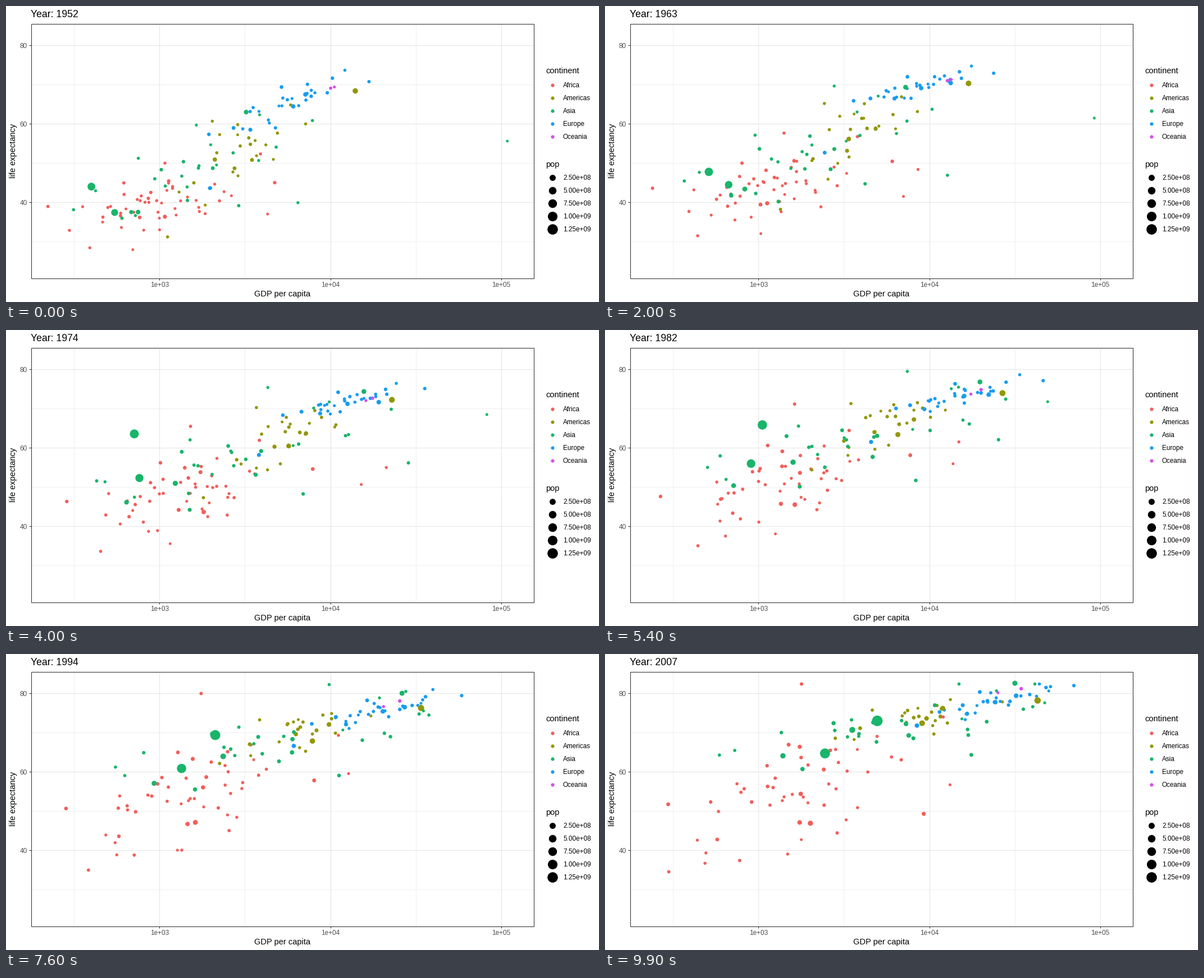
Animation, 1056 px wide and 528 px high, one loop 10000 ms. Source, as a matplotlib script:

```python
import numpy as np
import matplotlib
import matplotlib.pyplot as plt
from matplotlib.animation import FuncAnimation
from matplotlib.patches import Rectangle

matplotlib.rcParams["font.family"] = "Liberation Sans"

W, H, DPI = 1056, 528, 96
FRAMES, INTERVAL = 100, 100
YEARS = np.linspace(1952, 2007, FRAMES)
KEY_YEARS = [1952, 1963, 1974, 1989, 2007]
CENSUS = np.arange(1952, 2008, 5)
LEFT, RIGHT, TOP, BOTTOM = 44.5, 939.5, 31.5, 485.5
X_RANGE = (2.2487, 5.1887)  # log10 of GDP
Y_RANGE = (20.65, 85.55)
PX = 72 / DPI

rng = np.random.default_rng(11)


def x_px(log_gdp):
    return LEFT + (log_gdp - X_RANGE[0]) / (X_RANGE[1] - X_RANGE[0]) * (RIGHT - LEFT)


def y_px(life):
    return BOTTOM - (life - Y_RANGE[0]) / (Y_RANGE[1] - Y_RANGE[0]) * (BOTTOM - TOP)


def diameter(millions):
    return 4.73 + 14.2 * np.sqrt(millions / 1319)


def timeline(values):
    return np.interp(YEARS, KEY_YEARS, values)


def spread(n):
    """Evenly stratified bell-shaped scores in random order."""
    p = (rng.permutation(n) + 0.5) / n
    return 0.52 * np.log(p / (1 - p))


def drift(n):
    """Scores that wander slowly, with a small kink at each census."""
    u = np.linspace(0, 1, FRAMES)[:, None]
    a, b = spread(n), spread(n)
    b = 0.75 * a + 0.66 * b
    steps = rng.normal(0, 0.09, (len(CENSUS), n))
    kinks = np.array([np.interp(YEARS, CENSUS, s) for s in steps.T]).T
    mix = a * (1 - u) + b * u
    return mix / np.sqrt(1 - 0.5 * u * (1 - u)) + kinks


dots = []


def add_dot(color, log_gdp, life, pop, growth):
    size = np.linspace(diameter(pop / growth), diameter(pop), FRAMES)
    dots.append((color, x_px(log_gdp), y_px(life), size))


def add_cloud(color, n, growth, typical_pop, corr, gdp, gdp_sd, life, life_sd):
    """n dots scattered around a moving centre."""
    z, w = drift(n), drift(n)
    lg = timeline(gdp)[:, None] + timeline(gdp_sd)[:, None] * z
    tilt = corr * z + np.sqrt(1 - corr ** 2) * w
    le = timeline(life)[:, None] + timeline(life_sd)[:, None] * tilt
    le = np.clip(le, 24, 82.4)
    pops = np.clip(typical_pop * np.exp(1.1 * spread(n)), 0.3, 80)
    for k in range(n):
        add_dot(color, lg[:, k], le[:, k], pops[k], growth)


def add_road(color, pop, growth, gdp, life):
    """One prominent dot through its key positions."""
    add_dot(color, timeline(np.log10(gdp)), timeline(life), pop, growth)


RED, OLIVE, GREEN, BLUE, PINK = "#F35E5A", "#929705", "#18B56A", "#189CF2", "#D84FEB"
COLORS = {"Africa": RED, "Americas": OLIVE, "Asia": GREEN, "Europe": BLUE, "Oceania": PINK}

add_cloud(RED, 48, 3.75, 9, 0.45,
          [2.95, 3.05, 3.11, 3.12, 3.18], [0.26, 0.28, 0.28, 0.31, 0.38],
          [39.3, 43.5, 48.2, 53, 54.6], [4.9, 5.5, 6.2, 7.8, 9.3])
add_cloud(OLIVE, 22, 2.6, 9, 0.6,
          [3.46, 3.56, 3.71, 3.76, 3.93], [0.21, 0.22, 0.22, 0.23, 0.26],
          [52.3, 57.5, 62.5, 69, 73.8], [7.6, 7.3, 6.4, 4.5, 3.4])
add_cloud(GREEN, 26, 2.8, 18, 0.7,
          [3.17, 3.3, 3.48, 3.66, 3.82], [0.34, 0.37, 0.44, 0.48, 0.5],
          [47.2, 53.2, 58.2, 66.5, 71.8], [8.5, 8.8, 8.8, 7.2, 6.2])
add_cloud(BLUE, 28, 1.3, 10, 0.82,
          [3.75, 3.94, 4.1, 4.24, 4.4], [0.22, 0.2, 0.19, 0.22, 0.22],
          [65.2, 69.6, 71.8, 74.6, 78.1], [4.2, 2.4, 2.1, 2.4, 2.5])

add_road(RED, 135, 4, [1077, 1120, 1820, 1485, 2014], [36.3, 39.7, 43.6, 47.2, 46.9])
add_road(RED, 6, 6, [2388, 8500, 21450, 10800, 12057], [42.7, 48.3, 54.8, 67.4, 74])
add_road(RED, 1.5, 3, [4293, 7000, 15200, 12600, 13206], [37, 41.4, 50.5, 60.7, 56.7])
add_road(RED, 44, 3, [4725, 6050, 7890, 7590, 9270], [45, 50.4, 54.5, 61.3, 49.3])
add_road(OLIVE, 301, 1.9, [13990, 16900, 22800, 30800, 42952], [68.4, 70.3, 72.2, 75.5, 78.2])
add_road(OLIVE, 190, 3.4, [2109, 3360, 5680, 7400, 9066], [50.9, 56.1, 60.4, 66, 72.4])
add_road(OLIVE, 109, 3.6, [3478, 4830, 7180, 9050, 11978], [50.8, 58.7, 63.6, 70.4, 76.2])
add_road(GREEN, 1319, 2.4, [400, 511, 705, 1500, 4959], [44, 47.6, 63.5, 67.9, 73])
add_road(GREEN, 1110, 3, [547, 669, 760, 1055, 2452], [37.4, 44.4, 52.2, 59.3, 64.7])
add_road(GREEN, 127, 1.5, [3217, 7200, 15600, 24300, 31656], [63, 69.3, 74.3, 79, 82.6])
add_road(GREEN, 2.5, 15, [108382, 92300, 83500, 31000, 47307], [55.6, 61.4, 68.4, 74.7, 77.6])
add_road(GREEN, 28, 7, [6460, 12650, 28700, 22800, 21655], [39.9, 46.8, 56, 67.4, 72.8])
add_road(GREEN, 224, 2.7, [750, 829, 1230, 2000, 3541], [37.5, 43.3, 50.8, 61.2, 70.7])
add_road(GREEN, 150, 3.2, [684, 694, 640, 790, 1391], [37.5, 41.7, 46, 54.2, 64.1])
add_road(BLUE, 71, 3.2, [1969, 2430, 3800, 5350, 8458], [43.6, 52.6, 58.1, 64.5, 71.8])
add_road(BLUE, 82, 1.2, [7144, 13280, 19100, 25400, 32170], [67.5, 70.4, 71.6, 75.3, 79.4])
add_road(PINK, 20, 2.3, [10040, 12700, 17600, 22500, 34435], [69.1, 71, 72.6, 76.8, 81.2])
add_road(PINK, 4, 2, [10557, 13400, 16100, 18800, 25185], [69.4, 71.3, 72, 75.2, 80.2])

fills = [dot[0] for dot in dots]
xs, ys, sizes = (np.array([dot[k] for dot in dots]).T for k in (1, 2, 3))

fig = plt.figure(figsize=(W / DPI, H / DPI), dpi=DPI, facecolor="white")
ax = fig.add_axes([0, 0, 1, 1])
ax.set_xlim(0, W)
ax.set_ylim(H, 0)
ax.axis("off")


def line(x0, y0, x1, y1, color, width):
    ax.plot([x0, x1], [y0, y1], color=color, lw=width * PX, solid_capstyle="butt", zorder=1)


def label(x, y, text, size, color="black", **kw):
    return ax.text(x, y, text, fontsize=size, color=color, zorder=5, **kw)


def circle(x, y, d, color):
    ax.scatter([x], [y], s=(d * PX) ** 2, c=color, linewidths=0, zorder=3)


for v in (2.5, 3.5, 4.5):
    line(x_px(v), TOP, x_px(v), BOTTOM, "#EBEBEB", 0.8)
for v in (30, 50, 70):
    line(LEFT, y_px(v), RIGHT, y_px(v), "#EBEBEB", 0.8)
for v in (3, 4, 5):
    x = x_px(v)
    line(x, TOP, x, BOTTOM, "#E5E5E5", 1.07)
    line(x, BOTTOM, x, BOTTOM + 3.7, "#333333", 1.07)
    label(x, 501, f"1e+0{v}", 8.8, "#4D4D4D", ha="center")
for v in (40, 60, 80):
    y = y_px(v)
    line(LEFT, y, RIGHT, y, "#E5E5E5", 1.07)
    line(LEFT - 3.7, y, LEFT, y, "#333333", 1.07)
    label(37.8, y + 4.5, str(v), 8.8, "#4D4D4D", ha="right")
ax.add_patch(Rectangle((LEFT, TOP), RIGHT - LEFT, BOTTOM - TOP, fill=False,
                       ec="#333333", lw=1.07 * PX, zorder=4))

label(492, 518, "GDP per capita", 11, ha="center")
label(20, 258.5, "life expectancy", 11, rotation=90, ha="right", va="center")
title = label(44, 20, "", 13.2)

label(961.5, 120, "continent", 11)
for i, (name, color) in enumerate(COLORS.items()):
    y = 140.5 + 23.04 * i
    circle(973.3, y, 6.2, color)
    label(992, y + 4.5, name, 8.8)
label(961.5, 286.5, "pop", 11)
for i in range(5):
    y = 305.5 + 23.04 * i
    pop = 250 * (i + 1)
    circle(973.3, y, diameter(pop), "black")
    label(992, y + 4.5, f"{pop * 1e6:.2e}", 8.8)

cloud = ax.scatter(xs[0], ys[0], s=(sizes[0] * PX) ** 2, c=fills, linewidths=0, zorder=2)


def draw(i):
    cloud.set_offsets(np.column_stack([xs[i], ys[i]]))
    cloud.set_sizes((sizes[i] * PX) ** 2)
    title.set_text(f"Year: {int(YEARS[i] + 0.5)}")
    return cloud, title


anim = FuncAnimation(fig, draw, frames=FRAMES, interval=INTERVAL, repeat=True,
                     repeat_delay=0, init_func=lambda: draw(0))
plt.show()
```
